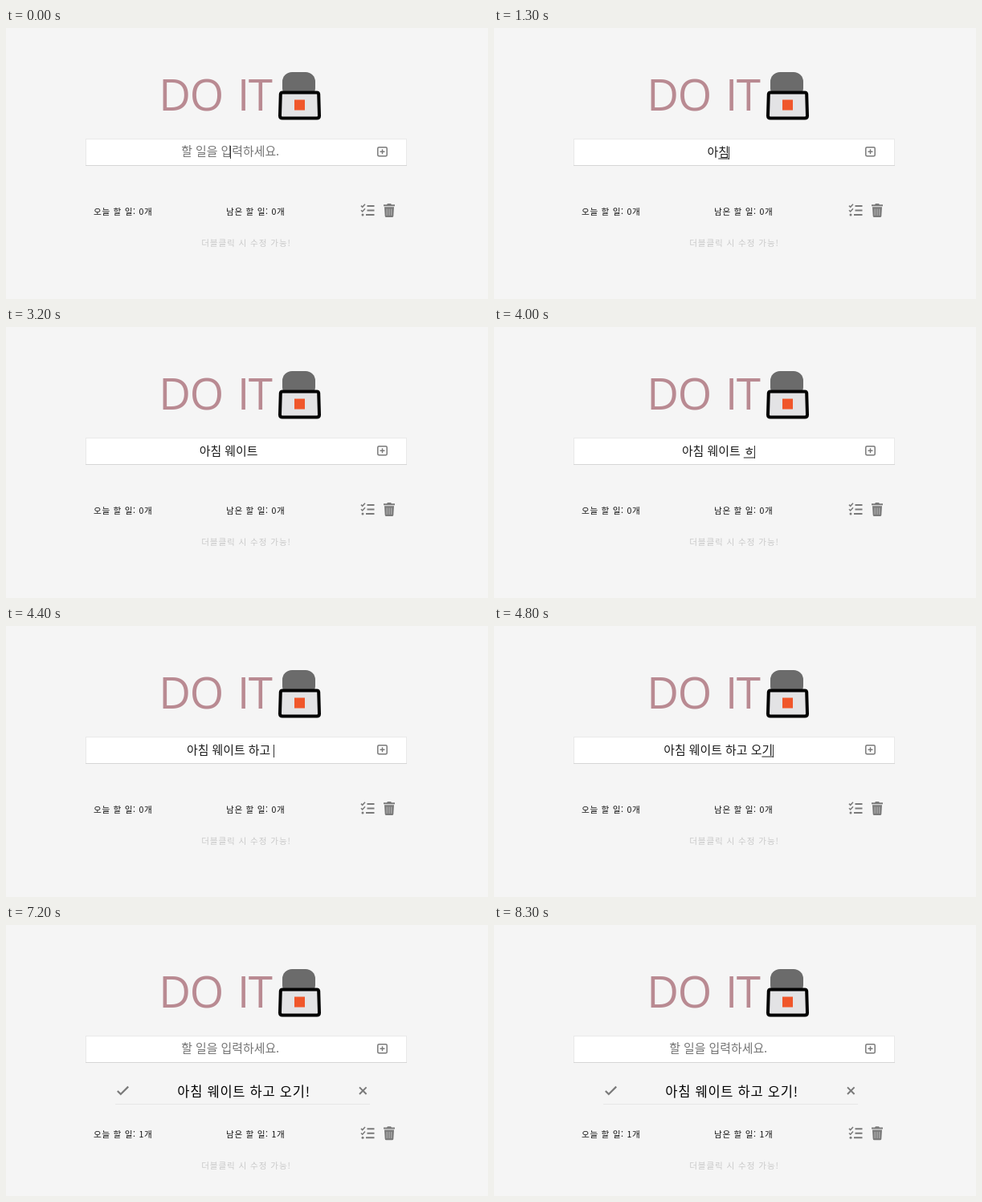
Write an HTML page that moves like this. It is 600 px wide and 338 px high and loops after 8400 ms.

```html
<!DOCTYPE html>
<html lang="ko">
<head>
<meta charset="utf-8">
<title>DO IT</title>
<style>
html, body { margin: 0; width: 100%; height: 100%; overflow: hidden; background: #f5f5f5; }
svg { display: block; width: 600px; height: 338px; }
text { font-family: "Noto Sans CJK KR", "Noto Sans CJK JP", "Noto Sans CJK", sans-serif; }
.title { font: 400 54.5px "Open Sans", "Noto Sans", sans-serif; letter-spacing: -1.4px; word-spacing: 5.5px; fill: #b98a92; }
.field { font-size: 14.9px; }
.small { font-size: 10.6px; letter-spacing: .7px; }
.note { font-size: 10.6px; letter-spacing: .9px; }
.item { font-size: 16.5px; letter-spacing: .75px; }
.line { fill: none; stroke: #7a7a7a; }
</style>
</head>
<body>
<svg viewBox="0 0 600 338">
  <rect width="600" height="338" fill="#f5f5f5"/>
  <text class="title" x="190.3" y="103.2">DO IT</text>

  <rect x="344" y="55" width="41" height="32" rx="12" fill="#6b6b6b"/>
  <path d="M344 80.500h43q2 0 2.200 2l.8 27q0 3-3 3h-43q-3 0-3-3l.8-27q.2-2 2.200-2z" fill="#e3e3e5" stroke="#000" stroke-width="4"/>
  <rect x="359" y="89.500" width="13" height="13" fill="#f0562a"/>

  <rect x="99" y="138" width="400" height="33" fill="#fff"/>
  <path d="M99 138.500H499M99.500 138V171M498.500 138V171" stroke="#e9e9e9"/>
  <path d="M99 171.500H499" stroke="#d6d6d6"/>
  <text id="hint" class="field" y="159" fill="#757575"></text>
  <text id="typed" class="field" y="160.300" fill="#1a1a1a"></text>
  <rect id="mark" y="162.500" height="1" fill="#222"/>
  <rect id="caret" width="1" height="16" fill="#333"/>
  <rect class="line" x="462.800" y="148.800" width="11.400" height="11" rx="1.500" stroke-width="1.500"/>
  <path class="line" d="M465.500 154.300h6M468.500 151.300v6" stroke-width="1.500"/>

  <g id="todo">
    <path class="line" d="M138.800 207l4 4 9.400-9.400" stroke-width="2.200"/>
    <text id="item" class="item" text-anchor="middle" x="296" y="213.600" fill="#000"></text>
    <path class="line" d="M440 202.400l8.600 8.600M448.600 202.400l-8.600 8.600" stroke-width="2"/>
    <path d="M136 223.500H453" stroke="#e6e6e6"/>
  </g>

  <g id="foot">
    <text id="total" class="small" x="109" y="232.800" fill="#111"></text>
    <text id="left" class="small" x="274" y="232.800" fill="#111"></text>
    <path class="line" d="M449.500 222h9M449.500 227.500h9M448 233h10.500" stroke-width="2"/>
    <path class="line" d="M442 221.600l1.700 1.700 3.300-3.600M442 227.200l1.700 1.700 3.300-3.600" stroke-width="1.500"/>
    <circle cx="444" cy="233" r="1.500" fill="#7a7a7a"/>
    <path d="M470 220.200h4l1-1.200h4l1 1.200h4v2h-14zM471 223.200h12l-.7 11.300q-.1 1.500-1.600 1.500h-7.400q-1.500 0-1.600-1.500z" fill="#7a7a7a"/>
    <path d="M474.200 225.500v8.300M477 225.500v8.300M479.800 225.500v8.300" stroke="#c4c4c4" stroke-width=".9"/>
    <text class="note" text-anchor="middle" x="299" y="271.500" fill="#c9c9c9">더블클릭 시 수정 가능!</text>
  </g>
</svg>
<script>
const LOOP = 8400, CENTER = 279.2, ENTER = 7000, TASK = '아침 웨이트 하고 오기!';
const $ = id => document.getElementById(id);

// [time, field content]; syllables build up as an input method composes them
const keys = [[0, ''], [500, '아'], [1000, '앛'], [1100, '아치'], [1300, '아침'], [1500, '아침 ']];
function type(start, base, parts) {
  parts.forEach((p, i) => keys.push([start + i * 100, base + p]));
}
type(1800, '아침 ', ['우', '웨', '웽', '웨이', '웨잍', '웨이트']);
keys.push([2600, '아침 웨이트 ']);
type(4000, '아침 웨이트 ', ['ㅎ', '하', '학', '하고', '하고 ', '하고 ㅇ', '하고 오', '하고 옥', '하고 오기']);
keys.push([5200, TASK], [ENTER, '']);

// intervals in which the caret is blinked off
const off = [[300, 500], [3200, 3700], [5900, 6500], [7000, 7400], [8100, 8400]];

const show = (el, on) => el.setAttribute('visibility', on ? 'visible' : 'hidden');
const setText = (el, s) => {
  s = s.replace(/ /g, '\u00a0');
  if (el.textContent !== s) el.textContent = s;
};

function place(el, s) {
  setText(el, s);
  const w = s ? el.getComputedTextLength() : 0;
  el.setAttribute('x', CENTER - w / 2);
  return w;
}

function draw(t) {
  const value = keys.filter(k => k[0] <= t).pop()[1];
  const done = t >= ENTER;
  const typed = $('typed'), mark = $('mark'), caret = $('caret');

  show($('hint'), !value);
  const w = place(typed, value);
  const end = CENTER + w / 2;

  const composing = /[ㄱ-ㅎ가-힣]$/.test(value);
  show(mark, composing);
  if (composing) {
    const last = typed.getSubStringLength(value.length - 1, 1);
    mark.setAttribute('x', end - last);
    mark.setAttribute('width', last);
  }

  caret.setAttribute('x', Math.round(end - 0.5));
  caret.setAttribute('y', value ? 148 : 147);
  show(caret, !off.some(([a, b]) => t >= a && t < b));

  show($('todo'), done);
  $('foot').setAttribute('transform', `translate(0 ${done ? 32.3 : 0})`);
  setText($('total'), `오늘 할 일: ${+done}개`);
  setText($('left'), `남은 할 일: ${+done}개`);
}

place($('hint'), '할 일을 입력하세요.');
setText($('item'), TASK);
const begin = performance.now();
function tick() {
  draw((performance.now() - begin) % LOOP);
  requestAnimationFrame(tick);
}
tick();
</script>
</body>
</html>
```
